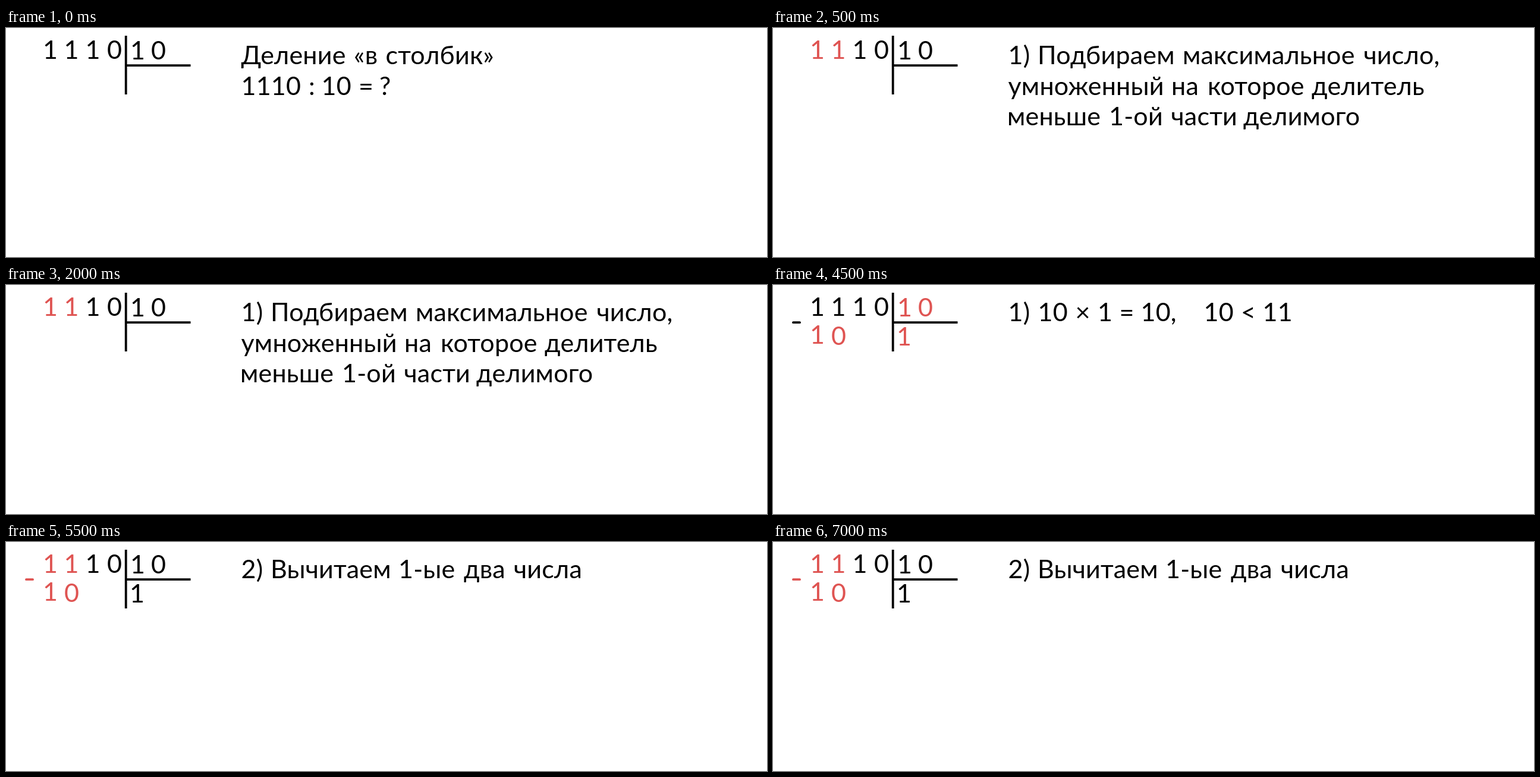
Write an HTML page that moves like this. It is 1280 px wide and 386 px high and loops after 8 s.

```html
<!DOCTYPE html>
<html lang="ru">
<head>
<meta charset="utf-8">
<style>
  html, body { margin: 0; width: 100%; height: 100%; overflow: hidden; background: #fff; }
  svg { display: block; width: 100%; height: 100%; }
  text { font: 43px Lato, "Open Sans", "Noto Sans", sans-serif; }
  .note { letter-spacing: .2px; }
</style>
</head>
<body>
<svg id="stage" viewBox="0 0 1280 386"></svg>
<script>
const stage = document.getElementById('stage');
const INK = '#000', RED = '#df5452', LOOP = 8000;

// Each digit: [character, centre x, baseline]
const groups = {
  first: [['1', 74.5, 52], ['1', 110, 52]],
  rest: [['1', 146, 52], ['0', 182.5, 52]],
  divisor: [['1', 221.5, 53], ['0', 256.5, 53]],
  product: [['1', 74.5, 99], ['0', 110.5, 101]],
  quotient: [['1', 220.5, 102]]
};

// Each note row holds pairs of word and left x.
const scenes = [
  { start: 0, red: [], hidden: ['product', 'quotient', 'minus'], notes: [
    ['Деление', 395.5, '«в', 585, 'столбик»', 638.5],
    ['1110', 395.5, ':', 509, '10', 530.5, '=', 593, '?', 628]] },
  { start: 500, red: ['first'], hidden: ['product', 'quotient', 'minus'], notes: [
    ['1)', 395.5, 'Подбираем', 445, 'максимальное', 689, 'число,', 993.5],
    ['умноженный', 395.5, 'на', 670, 'которое', 731, 'делитель', 906],
    ['меньше', 394, '1-ой', 565, 'части', 669.5, 'делимого', 791]] },
  { start: 3000, red: ['divisor', 'product', 'quotient'], hidden: [], notes: [
    ['1)', 395.5, '10', 445.5, '×', 508.5, '1', 546, '=', 582.5, '10,', 618.5, '10', 724.5, '<', 787, '11', 823.5]] },
  { start: 5500, red: ['first', 'product', 'minus'], hidden: [], notes: [
    ['2)', 395.5, 'Вычитаем', 445, '1-ые', 660, 'два', 770, 'числа', 854]] }
];

const text = (s, x, y, anchor = 'start') =>
  `<text x="${x}" y="${y}" text-anchor="${anchor}">${s.replace('<', '&lt;')}</text>`;

function row(words, i) {
  let out = '';
  for (let k = 0; k < words.length; k += 2) out += text(words[k], words[k + 1], 61 + i * 51.5);
  return out;
}

function draw(scene) {
  const color = id => scene.red.includes(id) ? RED : INK;
  const shown = id => !scene.hidden.includes(id);
  let out = `<path d="M201.7 13V112M201.7 63.2H310.5" stroke="${INK}" stroke-width="3.8"/>`;
  if (shown('minus'))
    out += `<path d="M34 63.2H45" stroke="${color('minus')}" stroke-width="3.8" stroke-linecap="round"/>`;
  for (const id in groups) {
    if (!shown(id)) continue;
    out += `<g fill="${color(id)}">${groups[id].map(d => text(...d, 'middle')).join('')}</g>`;
  }
  stage.innerHTML = `${out}<g class="note">${scene.notes.map(row).join('')}</g>`;
}

let current;
function tick() {
  const t = performance.now() % LOOP;
  const scene = scenes.findLast(s => t >= s.start);
  if (scene !== current) draw(current = scene);
  requestAnimationFrame(tick);
}
tick();
</script>
</body>
</html>
```
